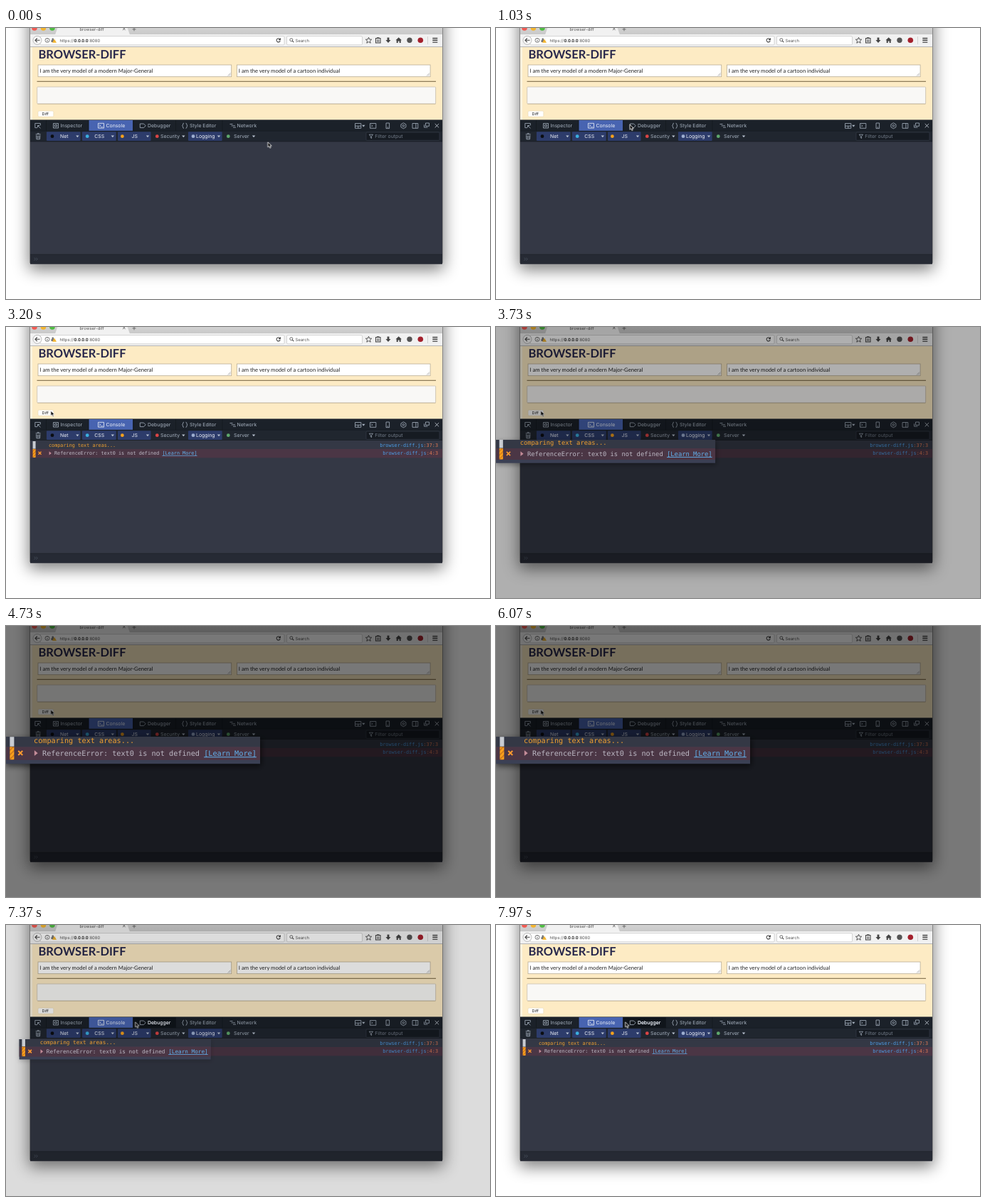
An HTML page that plays this animation: 680x382 px, repeating every 8 s.

```html
<!DOCTYPE html>
<html lang="en">
<head>
<meta charset="utf-8">
<title>browser-diff</title>
<style>
  @property --zoom { syntax: "<number>"; inherits: true; initial-value: 1; }
  html, body { margin: 0; width: 100%; height: 100%; overflow: hidden; background: #fff; }
  svg { display: block; width: 680px; height: 382px; animation: zoom 8s infinite; }
  text { font: 6.9px Inter, sans-serif; text-rendering: geometricPrecision; white-space: pre; }
  .page { font-family: Lato, sans-serif; font-size: 7.65px; fill: #222; }
  .title { font: bold 16.5px Lato, sans-serif; fill: #28284c; }
  .chrome { font-size: 5.9px; fill: #555; }
  .log { font: 6.8px "DejaVu Sans Mono", monospace; }
  .tool { fill: #a9b4c2; }
  .on { fill: #f2f5fa; }
  .line { fill: none; stroke: #a9b4c2; stroke-width: .8; }
  .dark { fill: none; stroke: #444; stroke-width: 1.1; }

  #dim { opacity: calc((var(--zoom) - 1) * 1.06); }
  #shade { opacity: calc((var(--zoom) - 1) * 1.2); filter: blur(3px); }
  /* Grows around its centre but never leaves the stage on the left. */
  #callout {
    transform: translate(max(0px, calc(153px - 119px * var(--zoom))), calc(175.3px - 12.65px * var(--zoom)))
      scale(var(--zoom)) translate(-34px, -162.65px);
    animation: callout 8s infinite step-end;
  }
  #output { animation: output 8s infinite step-end; }
  #hover { animation: hover 8s infinite step-end; }
  #press { animation: press 8s infinite step-end; }
  #cursor { animation: cursor 8s infinite ease-in-out; }

  @keyframes zoom {
    0%, 43.3% { --zoom: 1; animation-timing-function: cubic-bezier(.37, 0, .63, 1); }
    49.3%, 88.2% { --zoom: 1.5; animation-timing-function: cubic-bezier(.37, 0, .63, 1); }
    94.2%, 100% { --zoom: 1; }
  }
  @keyframes callout { 0% { visibility: hidden; } 43.3% { visibility: visible; } 94.2%, 100% { visibility: hidden; } }
  @keyframes output { 0% { visibility: hidden; } 35%, 100% { visibility: visible; } }
  @keyframes hover { 0% { visibility: hidden; } 86.4%, 100% { visibility: visible; } }
  @keyframes press { 0% { visibility: hidden; } 33.8% { visibility: visible; } 35%, 100% { visibility: hidden; } }
  @keyframes cursor {
    0%, 4% { transform: translate(367.8px, 160.8px); }
    20%, 27% { transform: translate(65.5px, 119.3px); }
    32%, 79% { transform: translate(62.8px, 118px); }
    87%, 100% { transform: translate(181.6px, 136.7px); }
  }
</style>
</head>
<body>
<svg viewBox="0 0 680 382">
  <defs>
    <filter id="blur" x="-20%" y="-20%" width="140%" height="150%"><feGaussianBlur stdDeviation="11"/></filter>
    <clipPath id="crop"><rect x="34" y="162.65" width="238" height="25.3"/></clipPath>
    <pattern id="hatch" width="3" height="3" patternUnits="userSpaceOnUse" patternTransform="rotate(45)">
      <rect width="3" height="3" fill="#ffa21a"/><rect width="1" height="3" fill="#c9741c"/>
    </pattern>
    <linearGradient id="bar" x2="0" y2="1"><stop stop-color="#d2d2d2"/><stop offset="1" stop-color="#c8c8c8"/></linearGradient>
    <path id="down" d="M-2.2-1.2h4.4L0 1.4z"/>
    <g id="entries">
      <rect x="34" y="160" width="579" height="12" fill="#343845"/>
      <rect x="34" y="172" width="579" height="12.4" fill="#4b3645"/>
      <rect x="37.6" y="161" width="4" height="10.6" fill="#c9ccd2"/>
      <rect x="37.6" y="172" width="4" height="12" fill="url(#hatch)"/>
      <path d="M45.5 175.8l4 4m0-4l-4 4" stroke="#ff9a2e" stroke-width="1.3"/>
      <path d="M60.6 175.3l3.2 2.6-3.2 2.6z" fill="#c48c98"/>
      <text class="log" x="60" y="168.5" fill="#f0a030">comparing text areas...</text>
      <text class="log" x="68" y="180.3" fill="#bdb9c5">ReferenceError: text0 is not defined <tspan fill="#62b2ee" text-decoration="underline">[Learn More]</tspan></text>
      <g text-anchor="end" fill="#4c9ee8">
        <text class="log" x="607" y="168.5">browser-diff.js<tspan fill="#df7a55">:37:3</tspan></text>
        <text class="log" x="607" y="180.3">browser-diff.js<tspan fill="#df7a55">:4:3</tspan></text>
      </g>
    </g>
  </defs>

  <rect width="680" height="382" fill="#fff"/>
  <rect x="32" y="-30" width="583" height="371" fill="#000" opacity=".5" filter="url(#blur)"/>
  <rect x="33.5" y="-10" width="580" height="342.6" rx="2" fill="#555"/>

  <!-- browser chrome -->
  <rect x="34" width="579" height="10" fill="url(#bar)"/>
  <path d="M69 9.5L73-2H170L174 9.5z" fill="#f1f1f1"/>
  <g>
    <circle cx="40" r="3.8" fill="#f25a52"/><circle cx="52.5" r="3.8" fill="#f3b52f"/><circle cx="65" r="3.8" fill="#4fbc43"/>
  </g>
  <text class="chrome" x="103.5" y="4">browser-diff</text>
  <path d="M164-.5l3.6 3.6m0-3.6L164 3.1M177.5 1.8h5m-2.5-2.5v5" stroke="#666" stroke-width=".9"/>
  <rect x="34" y="9" width="579" height="17.5" fill="#f1f1f1"/>
  <path d="M34 26.5h579" stroke="#b6b6b6"/>
  <rect x="48" y="11.5" width="343" height="12.3" rx="1.5" fill="#fff" stroke="#c4c4c4" stroke-width=".7"/>
  <rect x="394.5" y="11.5" width="106" height="12.3" rx="1.5" fill="#fff" stroke="#c4c4c4" stroke-width=".7"/>
  <circle cx="44" cy="17.3" r="6" fill="#fafafa" stroke="#aaa" stroke-width=".8"/>
  <path d="M47.5 17.3h-6.5m2.8-2.8l-2.8 2.8 2.8 2.8" class="dark"/>
  <circle cx="58" cy="17.3" r="3" class="dark" style="stroke-width:.7"/>
  <path d="M58 16.8v2.2m0-3.7v.7" class="dark" style="stroke-width:.8"/>
  <path d="M63.5 17h4.5v3h-4.5zM64.5 17v-2q1.2-1.6 2.5 0v2" fill="#777"/>
  <path d="M68 15.5l3 5.3h-6z" fill="#f3b52f"/>
  <text class="chrome" x="75.5" y="19.5">https://<tspan fill="#111" font-weight="600">0.0.0.0</tspan>:8080</text>
  <path d="M385 16a2.6 2.6 0 1 0 .2 2.2M385.4 14.2v2.4h-2.4" class="dark"/>
  <circle cx="400.8" cy="16.7" r="2" class="dark" style="stroke-width:.8"/><path d="M402.3 18.2l2 2" class="dark"/>
  <text class="chrome" x="406.5" y="19.5">Search</text>
  <path d="M509.5 13.2l1.2 2.8 3 .2-2.3 2 .8 3-2.7-1.6-2.7 1.6.8-3-2.3-2 3-.2z" class="dark" style="stroke-width:.9"/>
  <path d="M519.5 14.5h6.5v6.5h-6.5zM521 13.7h3.5M521 17h3.5m-3.5 2h3.5" class="dark"/>
  <path d="M535.6 13.5h2.8v3.5h2.1l-3.5 4-3.5-4h2.1zM547.5 17.3l4.2-4 4.2 4h-1.2v3.8h-2v-2.5h-2v2.5h-2v-3.8z" fill="#444"/>
  <circle cx="567" cy="17.3" r="3.7" fill="#555"/>
  <circle cx="582.3" cy="17.3" r="3.8" fill="#a3202c"/>
  <path d="M592.5 12v11" stroke="#ccc" stroke-width=".8"/>
  <path d="M599.3 14.5h7m-7 2.8h7m-7 2.8h7" class="dark" style="stroke-width:1.4"/>

  <!-- page -->
  <rect x="34" y="27" width="579" height="103" fill="#fdebc4"/>
  <path d="M35.5 27v103" stroke="#fbf3df" stroke-width="3"/>
  <text class="title" x="45.5" y="42.6">BROWSER-DIFF</text>
  <g fill="#fff" stroke="#b9ad94" stroke-width=".8">
    <rect x="45" y="52" width="271.7" height="16.7"/>
    <rect x="324.4" y="52" width="271.7" height="16.7"/>
  </g>
  <path d="M311.5 67.5l4-4m-2 4l2-2M591 67.5l4-4m-2 4l2-2" stroke="#999" stroke-width=".7"/>
  <text class="page" x="47.3" y="62.7">I am the very model of a modern Major-General</text>
  <text class="page" x="326.8" y="62.7">I am the very model of a cartoon individual</text>
  <path d="M43.5 75.4h560.5" stroke="#8d7b58" stroke-width="1.1"/>
  <rect x="44" y="83.5" width="560" height="24" rx="1" fill="#c8b58e"/>
  <rect x="43.7" y="83" width="560" height="23.8" rx="1" fill="#f9f8f6" stroke="#c9c1b0" stroke-width=".8"/>
  <rect x="45" y="117" width="21.8" height="8" rx="1.5" fill="#fff" stroke="#e1d2ad" stroke-width=".5"/>
  <rect id="press" x="45" y="117" width="21.8" height="8" rx="1.5" fill="#d6d2ca"/>
  <text class="chrome" x="50.6" y="123" style="font-size:5.6px;fill:#222">Diff</text>

  <!-- developer tools -->
  <rect x="34" y="129.6" width="579" height="203" fill="#343845"/>
  <rect x="34" y="129.6" width="579" height="15.6" fill="#1b2129"/>
  <rect x="34" y="145.2" width="579" height="14.8" fill="#20262f"/>
  <rect x="116.3" y="130" width="61.8" height="15" fill="#4864b1"/>
  <path d="M34 145.2h579M34 160h579M56.5 130v15M116 130v15M179 130v15M238.5 130v15M304 130v15" stroke="#11161c" stroke-width=".6"/>
  <g id="hover">
    <rect x="179" y="130" width="59.5" height="15" fill="#10151b"/>
  </g>
  <g class="line">
    <path d="M44 140.6h-3.2v-6.2h7.5v3M44.5 137.5l4 3.8m-4-3.8v2.7m0-2.7h2.7"/>
    <path d="M66.5 134.5h7v6.5h-7zM68.5 136.5h3v2.5h-3z"/>
    <path d="M129.5 134.3h8v6.8h-8zM131 136.3l1.8 1.5-1.8 1.5m2.8.3h2" stroke="#f2f5fa"/>
    <path d="M188.3 135h5.2l2.7 2.8-2.7 2.8h-5.2z"/>
    <path d="M250 134.2q-1.5 0-1.4 1.6t-1.2 2q1.3.4 1.2 2t1.4 1.6M252.5 134.2q1.5 0 1.4 1.6t1.2 2q-1.3.4-1.2 2t-1.4 1.6"/>
    <path d="M314.5 135.5h4m-2 2.3h5.5m-3 2.3h4"/>
    <path d="M490.5 134.5h8.3v6.8h-8.3zM490.5 138.2h8.3m-4 0v3"/>
    <path d="M511.5 134.5h8.3v6.8h-8.3zM513.3 136.5l1.6 1.4-1.6 1.4"/>
    <path d="M534 134h4.6v7.6H534zM535.4 140h1.8"/>
    <circle cx="558.4" cy="137.8" r="1.3"/><path d="M558.4 133.8l3.5 2v4l-3.5 2-3.5-2v-4z"/>
    <path d="M571 134.5h7.8v6.8H571zM575.9 134.5v6.8"/>
    <path d="M589.5 134h5v4.3h-5zM587.5 136.3v3.8h5"/>
    <path d="M602.7 135l5.4 5.4m0-5.4l-5.4 5.4" stroke="#cfd6df"/>
    <path d="M41.7 149.8h7m-4.8-1.2h2.6M42.5 151.2l.4 5.6h4.6l.4-5.6M44.3 151.8v3.8m1.8-3.8v3.8"/>
  </g>
  <use href="#down" x="502.3" y="138" fill="#a9b4c2"/>
  <g class="tool">
    <text x="76.5" y="140.3">Inspector</text>
    <text x="140.5" y="140.3" class="on">Console</text>
    <text x="199" y="140.3">Debugger</text>
    <text x="258" y="140.3">Style Editor</text>
    <text x="324.5" y="140.3">Network</text>
  </g>
  <text x="199" y="140.3" class="on" style="animation:hover 8s infinite step-end">Debugger</text>
  <g id="filters"></g>
  <rect x="506" y="147" width="103" height="11.4" rx="1" fill="#161b22" stroke="#3a424d" stroke-width=".6"/>
  <path d="M510.2 150.2h5.4l-2 2.4v3l-1.4-1v-2z" class="line" style="stroke-width:.7"/>
  <text x="518.3" y="155.2" fill="#737c89">Filter output</text>
  <rect x="34" y="319" width="579" height="13.4" fill="#262a34"/>
  <path d="M34 319.2h579" stroke="#1d2129" stroke-width=".7"/>
  <path d="M39.5 323.8l2 2-2 2m2.8-4l2 2-2 2" fill="none" stroke="#4c5361" stroke-width=".8"/>
  <use id="output" href="#entries"/>

  <path id="cursor" d="M0 0v7.2l1.7-1.5 1.2 2.7 1.4-.6-1.2-2.6h2.3z" fill="#111" stroke="#fff" stroke-width=".8"/>
  <rect id="dim" width="680" height="382" fill="#000"/>
  <g id="callout">
    <rect id="shade" x="34" y="164.5" width="239" height="25.5" fill="#000"/>
    <g clip-path="url(#crop)">
      <rect x="34" y="160" width="240" height="30" fill="#3b4054"/>
      <use href="#entries"/>
    </g>
  </g>
</svg>
<script>
  // label, label x, dot x, dot colour, arrow x, button x and width when active
  const filters = [
    ["Net", 76, 65, "#0b0d11", 100.4, 57, 47.5],
    ["CSS", 124.3, 114.2, "#3bb0e0", 149.8, 107, 47.8],
    ["JS", 176.6, 163.4, "#f5a11c", 199, 157, 46.5],
    ["Security", 217, 212.3, "#dd4545", 249.3],
    ["Logging", 267, 263, "#9daed0", 299, 256, 47.6],
    ["Server", 320, 312.3, "#5fa86c", 348],
  ];
  document.getElementById("filters").innerHTML = filters.map(([label, x, dot, color, arrow, left, width]) => `
    ${left ? `<rect x="${left}" y="146.2" width="${width}" height="12.8" rx="1" fill="#2d3c6b"/>` : ""}
    <circle cx="${dot}" cy="152.7" r="2.4" fill="${color}"/>
    <text x="${x}" y="155.2" class="${left ? "on" : "tool"}">${label}</text>
    <use href="#down" x="${arrow}" y="152.8" fill="#b9c3d2"/>`).join("");
</script>
</body>
</html>
```
